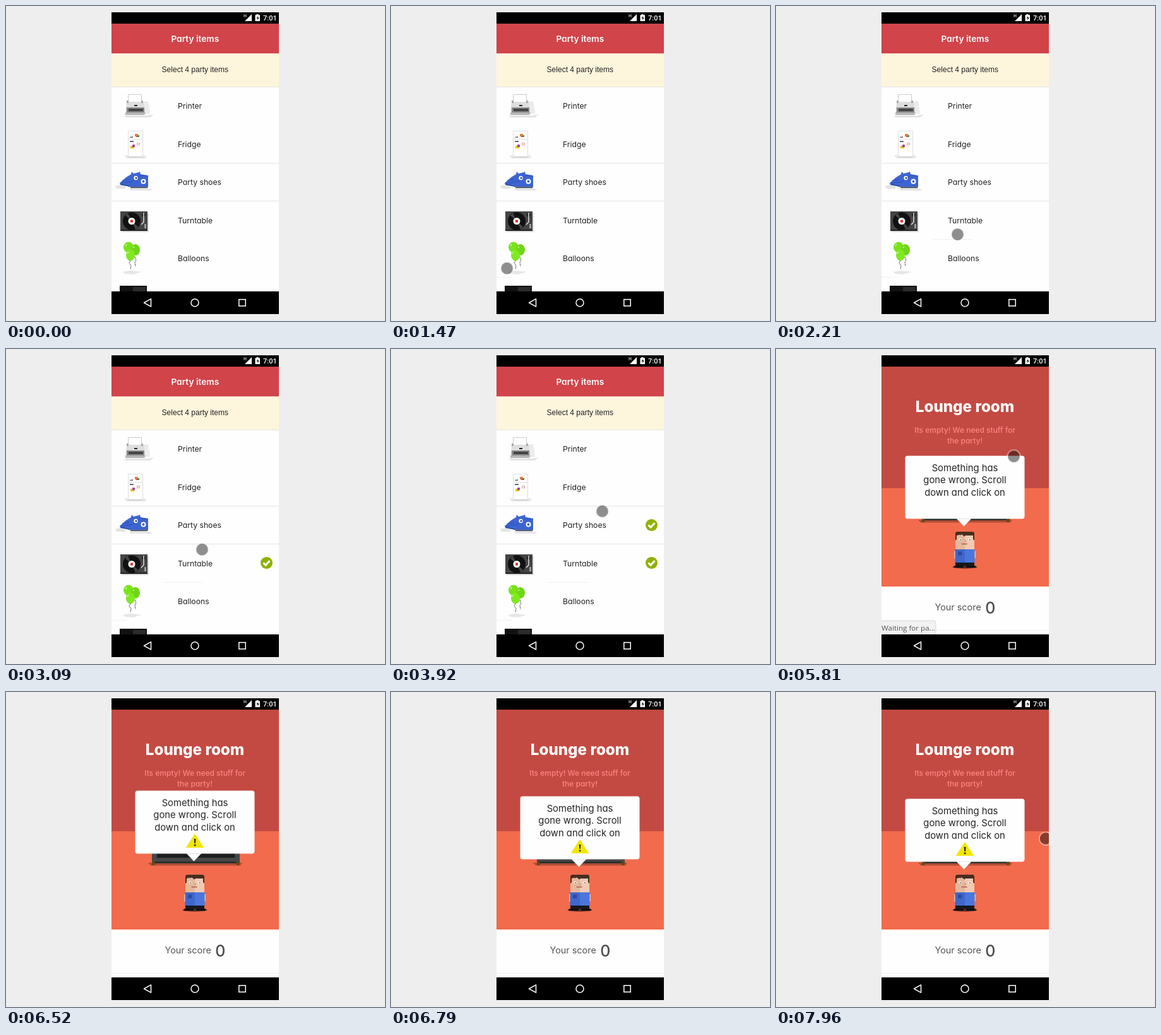
Recreate the animation shown at these times as an HTML page. Size 600x500 px, loop 8 s.

```html
<!DOCTYPE html>
<html lang="en">
<head>
<meta charset="utf-8">
<title>Party items</title>
<style>
  html, body { margin: 0; width: 100%; height: 100%; overflow: hidden; background: #eee; }
  svg { display: block; width: 600px; height: 500px; }
  text { font-family: Inter, Lato, sans-serif; font-feature-settings: "cv11"; fill: #222; }
  .mid { text-anchor: middle; }
  .item { font-size: 12.2px; }
  .divider { stroke: #e4e4e4; }
  .faint { stroke: #f0f0f0; }
  .speech { font-size: 14.8px; }
  .hint { font-size: 12px; font-weight: 500; fill: #ff8383; }

  /* Everything shares one 8 s loop. */
  .timed { animation: 8s step-end infinite; }
  .line-a { animation-name: line-a; }
  .line-b { animation-name: line-b; }
  .line-c { animation-name: line-c; }
  .tick-1 { animation-name: tick-1; }
  .tick-2 { animation-name: tick-2; }
  .tick-3 { animation-name: tick-3; }
  .room { animation-name: room; }
  .warning { animation-name: warning; }
  .status { animation-name: status; }
  .pointer { animation-name: pointer; }
  .bubble { animation: bounce 8s linear infinite; }

  @keyframes line-a { from { opacity: 0 } 18.3%, to { opacity: 1 } }
  @keyframes line-b { from { opacity: 0 } 26.8%, to { opacity: 1 } }
  @keyframes line-c { from { opacity: 0 } 65.625%, to { opacity: 1 } }
  @keyframes tick-1 { from { opacity: 0 } 33%, to { opacity: 1 } }
  @keyframes tick-2 { from { opacity: 0 } 42.375%, to { opacity: 1 } }
  @keyframes tick-3 { from { opacity: 0 } 54.375%, to { opacity: 1 } }
  @keyframes room { from { opacity: 0 } 72.625%, to { opacity: 1 } }
  @keyframes warning { from { opacity: 0 } 73.75%, to { opacity: 1 } }
  @keyframes status { from { opacity: 1 } 76%, to { opacity: 0 } }

  @keyframes bounce {
    0%, 76.375%, 80.5%, 83.875%, 86.375%, 100% {
      transform: translateY(0);
      animation-timing-function: cubic-bezier(.215, .61, .355, 1);
    }
    78.875%, 79.25% {
      transform: translateY(-30px);
      animation-timing-function: cubic-bezier(.755, .05, .855, .06);
    }
    82.625% {
      transform: translateY(-15px);
      animation-timing-function: cubic-bezier(.755, .05, .855, .06);
    }
    85.125% { transform: translateY(-4px); }
  }

  @keyframes pointer {
    0% { transform: translate(157px, 429px) }
    2.625% { transform: translate(158.3px, 429.5px) }
    4.5% { transform: translate(159px, 428px) }
    17.375% { transform: translate(159px, 428px); animation-timing-function: steps(8, start) }
    24.8% { transform: translate(257.5px, 381.5px) }
    25.875% { transform: translate(257.5px, 381.5px); animation-timing-function: steps(3, start) }
    28.5% { transform: translate(287.5px, 362.5px); animation-timing-function: steps(2, start) }
    30.4% { transform: translate(305.5px, 345.5px) }
    36% { transform: translate(302.5px, 337px) }
    36.9% { transform: translate(302.5px, 337px); animation-timing-function: steps(4, start) }
    40.525% { transform: translate(318.5px, 299.5px) }
    45.75% { transform: translate(318.5px, 299.5px); animation-timing-function: steps(5, start) }
    49.75% { transform: translate(334.5px, 257.5px); animation-timing-function: steps(3, start) }
    52% { transform: translate(339.5px, 245.5px) }
    58.625% { transform: translate(339.5px, 245.5px); animation-timing-function: steps(6, start) }
    63.875% { transform: translate(374.5px, 178.5px) }
    65.625% { transform: translate(374.5px, 178.5px); animation-timing-function: steps(2, start) }
    67.125% { transform: translate(376.5px, 170.5px) }
    76% { transform: translate(376.5px, 170.5px); animation-timing-function: steps(4, start) }
    79.5% { transform: translate(445px, 146px) }
    92.125% { transform: translate(421px, 223px) }
    92.875% { transform: translate(427px, 230px) }
    99.5%, 100% { transform: translate(427px, 232.5px) }
  }
</style>
</head>
<body>
<svg viewBox="0 0 600 500">
  <defs>
    <clipPath id="screen"><rect x="167" y="28" width="265" height="425"/></clipPath>
    <g id="tick">
      <circle r="9.5" fill="#8fb100"/>
      <path d="M-5 0l3.6 3.6L5-3.2" fill="none" stroke="#fff" stroke-width="3"/>
    </g>
  </defs>

  <rect width="600" height="500" fill="#eee"/>
  <rect x="167" y="10" width="265" height="479"/>

  <!-- status bar -->
  <g fill="#fff">
    <path d="M389 13v11h-11z"/>
    <path d="M377 13v5M380 13v5M377 15.5h3" stroke="#ccc" stroke-width=".9"/>
    <path d="M396.5 13h3v1.3h2.5V24h-7.500v-9.700h2z"/>
    <path d="M399.500 15.500l-3 4h2.200l-.7 3.200 2.900-4.200h-2.200z" fill="#000"/>
    <text x="407" y="22.700" style="font:500 11px Roboto,sans-serif;fill:#fff">7:01</text>
  </g>

  <!-- navigation bar -->
  <g fill="none" stroke="#fff" stroke-width="1.500">
    <path d="M229.500 464.800v12.400L218.500 471z" stroke-linejoin="round"/>
    <circle cx="299" cy="471" r="6"/>
    <rect x="368.800" y="465.800" width="10.400" height="10.400"/>
  </g>

  <g clip-path="url(#screen)">
    <rect x="167" y="28" width="265" height="425" fill="#fefefe"/>
    <rect x="167" y="28" width="265" height="47.500" fill="#d0444a"/>
    <rect x="167" y="75.500" width="265" height="53" fill="#fef5dd"/>
    <text class="mid" x="299.300" y="57" style="font-size:13.700px;font-weight:600;fill:#fff">Party items</text>
    <text class="mid" x="299.300" y="105" style="font:12px 'Liberation Sans',sans-serif">Select 4 party items</text>

    <path class="divider" d="M167 128.500h265M167 249.500h265M167 309.500h265"/>
    <path class="faint timed line-a" d="M167 430.500h25"/>
    <path class="faint timed line-b" d="M248 370.500h64"/>
    <path class="faint timed line-c" d="M359 188.500h25"/>

    <!-- printer -->
    <path d="M186 174h38l10-2-6 5h-38z" fill="#e3e3e3"/>
    <path d="M193.500 153v-12.500h21V153" fill="#fefefe" stroke="#ccc"/>
    <path d="M191 152h34l3 19h-39z" fill="#dedede"/>
    <path d="M218 153h7l3 18h-7z" fill="#ececec"/>
    <path d="M191 150h3v4h-3zM214 150h3v4h-3z" fill="#aaa"/>
    <path d="M203 157h5v2h-5z" fill="#222"/>
    <path d="M191 161h28v8h-28z" fill="#888"/>
    <path d="M194 163h23v4h-23z" fill="#444"/>
    <path d="M189 169h32l-2 4h-30z" fill="#b5b5b5"/>

    <!-- fridge -->
    <path d="M187 237h33l3 3-4 2h-28z" fill="#e8e8e8"/>
    <path d="M193.500 198.500h23v41h-23zM193.500 211.500h23" fill="#fff" stroke="#ddd"/>
    <path d="M194 239.500h22" stroke="#bbb"/>
    <path d="M196 208l5-1v2h-5zM196 214h6v2h-6z" fill="#667"/>
    <path d="M204 203h5v4h-5z" fill="#e77b3c"/>
    <path d="M208 205h3v3h-3z" fill="#3a9a50"/>
    <path d="M206 207h3v1h-3z" fill="#d22"/>
    <path d="M197 222h6v4h-6z" fill="#e5c516"/>
    <path d="M200 220h4v4h-4z" fill="#a4459c"/>
    <path d="M207.500 217.500h4v3h-4z" fill="#fff" stroke="#d99"/>

    <!-- shoes -->
    <path d="M172 286l8-2h9v6h-13zM195 290h33l4 2-5 1h-30z" fill="#e4e4e4"/>
    <path d="M180 281l10-9 8-5 1-4 3 3 8-2 2-1 1 4 12 2v18h-27l-17-3z" fill="#3d65d2"/>
    <path d="M182 281l17-2 14-10 11 1M184 277l11-2" fill="none" stroke="#2448ad" stroke-dasharray="3 1"/>
    <path d="M182 283l16 4h27" fill="none" stroke="#1d367e"/>
    <path d="M197 288.500h27" stroke="#222"/>
    <circle cx="205.500" cy="273" r="3.200" fill="#fff"/>
    <circle cx="206" cy="273" r="1.500" fill="#238"/>
    <circle cx="217.500" cy="278.500" r="4" fill="#fff"/>
    <circle cx="217.500" cy="278.500" r="2" fill="#3d65d2"/>

    <!-- turntable -->
    <path d="M183 329h43v30h-43z" fill="#ddd"/>
    <path d="M181 326h43v31h-43z" fill="#444"/>
    <path d="M181 355h43v2h-43z" fill="#222"/>
    <circle cx="199" cy="341.500" r="14" fill="#111"/>
    <path d="M199 341.500l-10-9 4-4zM199 341.500l10 9-4 4z" fill="#444"/>
    <circle cx="199" cy="341.500" r="5.500" fill="#fff"/>
    <path d="M197 339.500h4v4h-4z" fill="#e2332d"/>
    <circle cx="218" cy="331.500" r="3" fill="#222"/>
    <path d="M218 328v15l-4 4" fill="none" stroke="#ddd" stroke-width="1.500"/>
    <path d="M219 346h3v7h-3z" fill="#999"/>

    <!-- balloons -->
    <path d="M185 422l12-2 18 2-14 4-12-1z" fill="#e6e6e6"/>
    <path d="M197 404l-2 4 3 4-1 6M204 398l2 5-2 4 1 6" fill="none" stroke="#333" stroke-dasharray="2 1"/>
    <ellipse cx="194" cy="383" rx="8" ry="8.500" fill="#79e31a"/>
    <ellipse cx="205" cy="387" rx="7" ry="9" fill="#70d518"/>
    <ellipse cx="197" cy="395.500" rx="7" ry="9" fill="#7fe91f"/>
    <path d="M189 381l2-3M201 384l2-2M192 393l2-3" stroke="#c9f79b" stroke-width="1.500"/>

    <path d="M180 444h43v9h-43z" fill="#111"/>
    <path d="M201 446h20v7h-20z" fill="#2b2b2b"/>

    <g class="item">
      <text x="272" y="163">Printer</text>
      <text x="272" y="224">Fridge</text>
      <text x="272" y="284">Party shoes</text>
      <text x="272" y="345">Turntable</text>
      <text x="272" y="405">Balloons</text>
    </g>

    <g class="timed tick-1"><use href="#tick" x="412.500" y="339.500"/></g>
    <g class="timed tick-2"><use href="#tick" x="412.500" y="279.500"/></g>
    <g class="timed tick-3"><use href="#tick" x="412.500" y="218.800"/></g>

    <g class="timed room">
      <rect x="167" y="28" width="265" height="193" fill="#c34a42"/>
      <rect x="167" y="221" width="265" height="156" fill="#f26b4d"/>
      <rect x="167" y="377" width="265" height="76" fill="#fefefe"/>
      <path d="M167 446.500h265" stroke="#eee"/>
      <text class="mid" x="299" y="99.500" style="font-size:24.200px;font-weight:800;fill:#fff">Lounge room</text>
      <text class="mid hint" x="299" y="133">Its empty! We need stuff for</text>
      <text class="mid hint" x="299" y="150">the party!</text>
      <text x="251.500" y="415" style="font-size:14.400px;fill:#555">Your score</text>
      <text x="331.300" y="420" style="font-size:25px;font-weight:500;fill:#505050">0</text>

      <!-- television -->
      <path d="M225 271h149l-3 4.500H229z" fill="#b14d35"/>
      <path d="M231 200h139v72H231z" fill="#474747"/>
      <path d="M239 206h123v57H239z" fill="#1d1d1d"/>
      <path d="M231 270.500h139" stroke="#272b2a" stroke-width="2.500"/>
      <path d="M231 269h4.500v6H231zM365 269h4.500v6H365z" fill="#654916"/>

      <!-- host -->
      <ellipse cx="299" cy="346" rx="19.500" ry="2.500" fill="#5b2a20"/>
      <path d="M282 321h4v12h-4zM313 321h3v11h-3z" fill="#edbfa5"/>
      <path d="M284 293h15v25h-15z" fill="#e5b89c"/>
      <path d="M299 293h15v25h-15z" fill="#f1cab2"/>
      <path d="M284 304v-12l2-2h26l2 2v12l-2-2v-6h-14l-4-2-8 2v6z" fill="#482e1f"/>
      <path d="M291 295l3-2 5 4" fill="none" stroke="#482e1f" stroke-width="2"/>
      <circle cx="291.500" cy="302.500" r="2" fill="#fff"/>
      <circle cx="306.500" cy="302.500" r="2" fill="#fff"/>
      <path d="M291 302h1.500v1.500H291zM306 302h1.500v1.500H306z" fill="#222"/>
      <path d="M298 303h3v4h-3z" fill="#d9a487"/>
      <path d="M293.500 309.500h9" stroke="#b76659" stroke-width="1.800"/>
      <path d="M283.500 318h15.500v22h-15.500z" fill="#3f67cc"/>
      <path d="M299 318h15.500v22H299z" fill="#4b76dc"/>
      <path d="M288 321.500h6.500v6H288z" fill="#2b4ba2"/>
      <path d="M284 339h30v5h-30z" fill="#16191d"/>
      <path d="M282 344h15v3h-15zM301 344h15v3h-15z" fill="#111"/>

      <g class="bubble">
        <path d="M285.500 269h24l-12 12.500z" fill="#fefefe"/>
        <rect x="204.500" y="169.500" width="189" height="100" rx="4" fill="#fefefe"/>
        <path d="M286 269.500h23" stroke="#ddd" stroke-width=".8"/>
        <g class="mid">
          <text class="speech" x="299" y="194">Something has</text>
          <text class="speech" x="299" y="213.300">gone wrong. Scroll</text>
          <text class="speech" x="299" y="233">down and click on</text>
        </g>
        <g class="timed warning">
          <path d="M299 238.500l13.500 21h-27z" fill="#f2e600" stroke="#f2e600" stroke-linejoin="round"/>
          <path d="M297.700 246h2.800l-.6 7h-1.600zM297.800 254.800h2.600v2.400h-2.600z" fill="#222"/>
        </g>
      </g>

      <g class="timed status">
        <path d="M166.500 454v-22.500h83.500q3 0 3 3V454z" fill="#f2f2f2" stroke="#d6d6d6"/>
        <text x="167" y="447" style="font:11.600px 'Open Sans',sans-serif;fill:#555">Waiting for pa...</text>
      </g>
    </g>

    <g class="timed pointer">
      <circle r="9.500" fill="#000" fill-opacity=".44"/>
      <circle r="10.200" fill="none" stroke="#fff" stroke-opacity=".5" stroke-width="1.600"/>
    </g>
  </g>
</svg>
</body>
</html>
```
